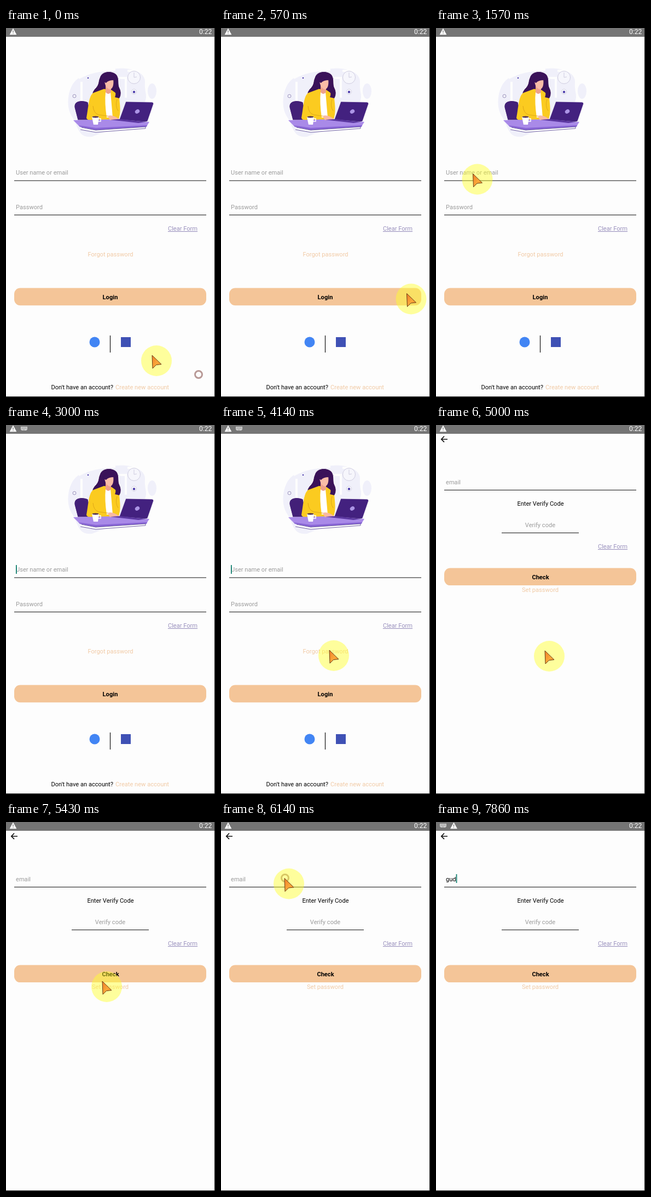
An HTML page that plays this animation: 382 px wide and 672 px high, repeating every 8000 ms.

```html
<!DOCTYPE html>
<html lang="en">
<head>
<meta charset="utf-8">
<title>Login and verify screens</title>
<style>
html, body { margin: 0; height: 100%; overflow: hidden; background: #fdfdfd; }
svg { display: block; width: 100vw; height: 100vh; }
text { font: 11.1px Roboto, Arial, sans-serif; }
.mid { text-anchor: middle; }
.bold { font-weight: 700; }
.hint { fill: #9b9b9b; }
.peach { fill: #f1caa5; }
.link { fill: #9990bd; text-decoration: underline; }
.button { fill: #f4c598; }
#halo { fill: #ffff26; opacity: .45; }
</style>
</head>
<body>
<svg viewBox="0 0 382 672">
  <defs>
    <linearGradient id="gold" x2="1" y2="1">
      <stop offset="0" stop-color="#f07c28"/>
      <stop offset=".55" stop-color="#f9a83a"/>
      <stop offset="1" stop-color="#f58a25"/>
    </linearGradient>
  </defs>
  <rect width="382" height="672" fill="#fdfdfd"/>

  <g id="login">
    <g id="art">
      <g fill="#f0f0fa">
        <path d="M128 95C145 80 172 82 188 76C216 69 255 76 254 98C252 119 263 127 248 141L225 172L157 198C131 201 132 178 121 162C108 143 113 109 128 95Z"/>
        <ellipse cx="267" cy="115" rx="8" ry="14"/>
      </g>
      <path d="M133 91Q161 75 200 76M138 98V135M206 91H219V127M222 78H253" fill="none" stroke="#fdfdfd" stroke-width="4"/>
      <g fill="none" stroke="#cfcde0">
        <circle cx="234" cy="90" r="11.500" fill="#f6f6fc"/>
        <path d="M234 81V90L239 89"/>
        <circle cx="125" cy="124" r="3" stroke="#9c94bd"/>
        <circle cx="234" cy="116" r="4.500" fill="#fff"/>
      </g>
      <g fill="#5141ae">
        <circle cx="234" cy="116.500" r="2.300"/>
        <circle cx="150" cy="91" r="1.300"/><circle cx="205" cy="92" r="1"/>
      </g>
      <g stroke="#fdfdfd">
        <path d="M125 145C123 132 139 130 150 135L157 168H131Z" fill="#432078"/>
        <path d="M171 91C175 77 195 76 203 86C208 94 204 102 208 110C213 120 208 128 198 127L166 127C153 124 158 115 164 109C170 102 168 98 171 91Z" fill="#3a1259"/>
      </g>
      <path d="M179 111L160 118C151 123 151 143 147 164Q149 169 158 168H205C211 155 208 139 207 127Q204 120 193 113Z" fill="#fbcb20"/>
      <path d="M193 109C200 112 202 119 199 126L207 128C212 121 209 112 205 106Z" fill="#3a1259"/>
      <path d="M182 117L191 116L195 163H184Q180 136 182 117Z" fill="#fff"/>
      <path d="M182 104H192V117Q187 123 182 117Z" fill="#eea18b"/>
      <path d="M180 93Q190 88 196 93Q198 109 190 112Q180 109 180 93Z" fill="#f9bca7"/>
      <path d="M178 98C180 84 193 84 197 95Q187 95 183 100Z" fill="#3a1259"/>
      <path d="M159 142Q160 155 169 158L190 161M203 130Q199 142 205 151" fill="none" stroke="#e0a818"/>
      <path d="M123 168L205 166L262 171L257 179L164 184L132 177Z" fill="#a98ae8"/>
      <path d="M132 177L164 182L258 177L257 180L164 186L135 180Z" fill="#8966d6"/>
      <path d="M186 160Q195 157 207 166L190 168Z" fill="#f8b9a2"/>
      <path d="M138 181L164 186L255 180V183L164 190L136 185" fill="#fdfdfd" stroke="#4f3d8d" stroke-width=".8"/>
      <path d="M219 134L267 135Q271 136 269 140L259 169Q258 171 254 171L207 167Z" fill="#43217f" stroke="#fdfdfd" stroke-width=".7"/>
      <path d="M190 167L209 166L256 171L242 173Z" fill="#5b37a0"/>
      <ellipse cx="240" cy="152" rx="4.500" ry="3.500" fill="#ab94e5" transform="rotate(-35 240 152)"/>
      <path d="M169 165H173V170H168" fill="none" stroke="#fff" stroke-width="1.500"/>
      <path d="M157 162H170L168 176H160Z" fill="#fff"/>
      <ellipse cx="163.500" cy="162" rx="6" ry="1.500" fill="#4c2d51"/>
    </g>
    <path d="M15 278H366M15 340.500H366M190.500 560V591" stroke="#111" stroke-width="1.200"/>
    <text class="hint" x="18" y="267">User name or email</text>
    <text class="hint" x="18" y="330">Password</text>
    <text class="link mid" x="323" y="369">Clear Form</text>
    <text class="peach mid" x="191" y="416">Forgot password</text>
    <rect class="button" x="15" y="473.600" width="351" height="31.600" rx="11"/>
    <text class="bold mid" x="190.500" y="494">Login</text>
    <circle cx="162" cy="572" r="9.500" fill="#4285f4"/>
    <rect x="210" y="563" width="18" height="18" fill="#3f51b5"/>
    <text x="82.500" y="658">Don't have an account?</text>
    <text class="peach" x="200" y="658">Create new account</text>
  </g>

  <g id="verify">
    <path d="M21 26H10M15 20.500L9.800 26L15 31.200" fill="none" stroke="#111" stroke-width="1.700"/>
    <path d="M15 118.500H366M120 196.500H261" stroke="#111" stroke-width="1.200"/>
    <text id="email" x="18" y="108"></text>
    <text class="mid" x="191" y="147">Enter Verify Code</text>
    <text class="hint mid" x="190.500" y="186">Verify code</text>
    <text class="link mid" x="323" y="225">Clear Form</text>
    <rect class="button" x="15" y="260.500" width="351" height="31.600" rx="11"/>
    <text class="bold mid" x="191" y="281">Check</text>
    <text class="peach mid" x="190.500" y="304">Set password</text>
  </g>

  <rect id="caret" width="1.800" height="16" fill="#128070"/>

  <rect width="382" height="16" fill="#757575"/>
  <text x="353" y="11" fill="#fff" style="font-size:12px">0:22</text>
  <g id="warning">
    <path d="M6 1L12 12H0Z" fill="#fff" stroke="#fff" stroke-width=".5"/>
    <path d="M6 4.500V8.300M6 9.400V10.700" stroke="#757575" stroke-width="1.300"/>
  </g>
  <g id="keyboard">
    <path d="M0 3H12V8L10 10H2L0 8Z" fill="#cfcfcf"/>
    <path d="M1.500 4.700H11M1.500 6.700H11M4 8.700H8" stroke="#757575" stroke-dasharray="1 1"/>
  </g>
  <path d="M381.500 0V672M0 671.500H382" stroke="#111"/>

  <circle id="ring" r="6.500" fill="none" stroke="#b89996" stroke-width="3"/>
  <circle id="halo" r="28"/>
  <path id="arrow" d="M0 0L17 16.500L7.500 17.500L1 24Z" fill="url(#gold)" stroke="#6a3d18" stroke-linejoin="round"/>
</svg>
<script>
const STEPS = 56, STEP_MS = 8000 / STEPS;
const $ = id => document.getElementById(id);
const show = (id, on) => $(id).style.display = on ? "" : "none";
const place = (id, x, y) => $(id).setAttribute("transform", `translate(${x} ${y})`);
const within = (k, spans) => spans.some(([from, to]) => k >= from && k < to);

// Pointer tip: [step, x, y]
const path = [
  [0, 267, 596], [2, 315, 555], [4, 339.5, 483.5], [8, 122, 306], [10, 71, 268], [11, 67.5, 265.5],
  [14, 67.5, 265.5], [27, 110, 335], [29, 198, 410], [35, 199, 411], [38, 176, 290],
  [42, 116, 102.5], [56, 116, 102.5]
];
// Taps: [from step, to step, x, y]
const taps = [[0, 2, 352, 631], [13, 16, 67, 265], [30, 33, 199, 411], [43, 45, 117, 102]];

function pointerAt(k) {
  const i = path.findIndex(p => p[0] > k);
  const [a, x, y] = path[i - 1], [b, u, v] = path[i];
  const f = (k - a) / (b - a);
  return [x + (u - x) * f, y + (v - y) * f];
}

function draw(k) {
  const second = k >= 33;
  show("login", !second);
  show("verify", second);

  const typed = "gud".slice(0, k < 52 ? 0 : k < 53 ? 1 : k < 55 ? 2 : 3);
  const email = $("email");
  email.textContent = typed || "email";
  email.setAttribute("class", typed ? "" : "hint");
  show("caret", within(k, [[14, 17], [21, 24], [27, 31], [45, 47], [51, STEPS]]));
  place("caret", 18 + (typed ? email.getComputedTextLength() : 0), second ? 95 : 255);

  const swapped = k >= 45;
  place("warning", swapped ? 26.5 : 7, 0);
  place("keyboard", swapped ? 7 : 27, 0);
  show("keyboard", swapped || within(k, [[14, 33]]));

  const tap = taps.find(([from, to]) => within(k, [[from, to]]));
  show("ring", tap);
  if (tap) place("ring", tap[2], tap[3]);

  const [x, y] = pointerAt(k), visible = within(k, [[0, 14], [27, 44]]);
  show("halo", visible);
  show("arrow", visible);
  place("halo", x + 8, y + 10);
  place("arrow", x, y);
}

const start = performance.now();
function tick() {
  // Small lead keeps rounded times on the right step.
  draw(Math.floor((performance.now() - start + 4) / STEP_MS) % STEPS);
  requestAnimationFrame(tick);
}
tick();
</script>
</body>
</html>
```
